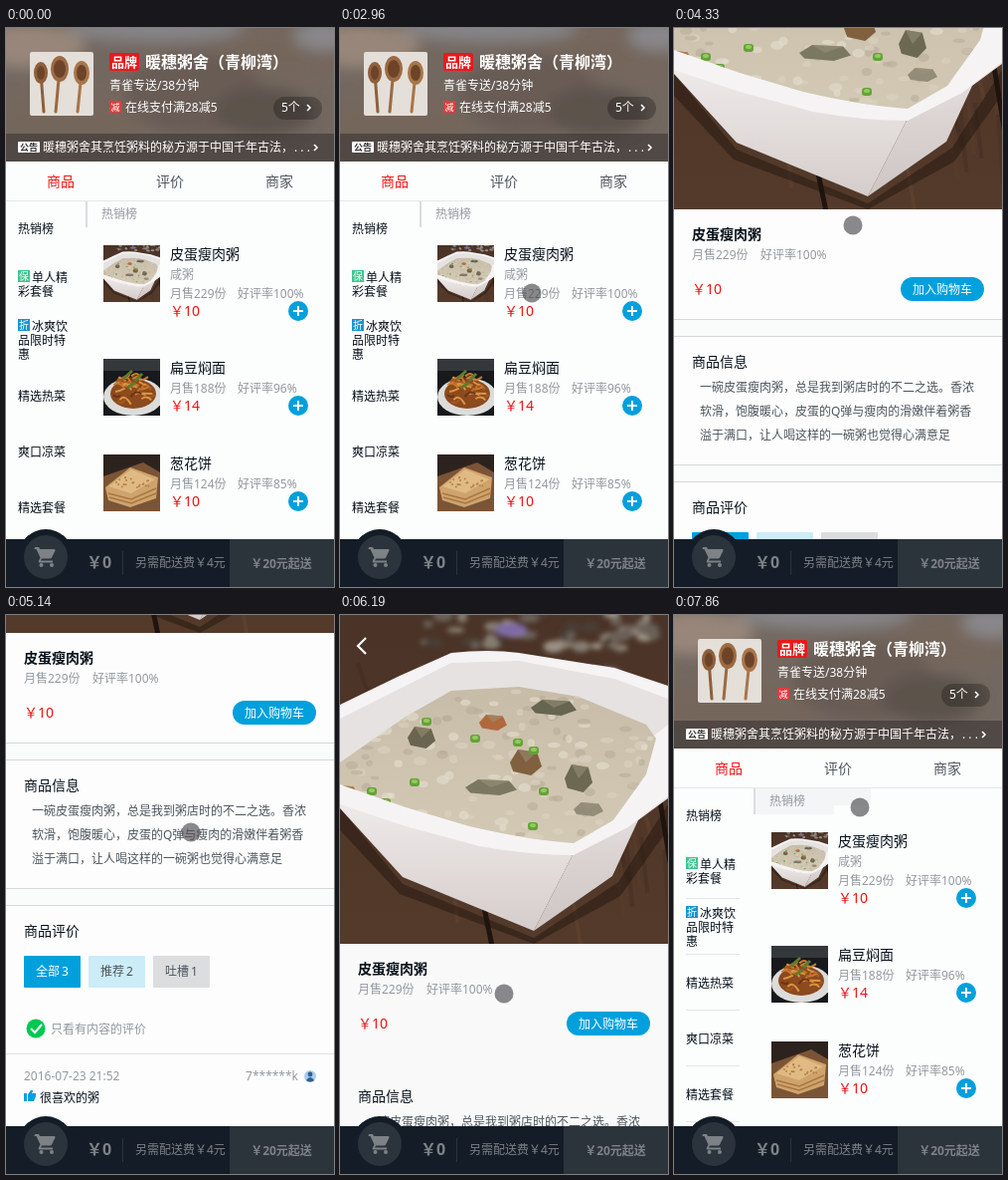
An HTML page that plays this animation: 330x561 px, repeating every 8 s.

```html
<!DOCTYPE html>
<html lang="zh-CN">
<head>
<meta charset="utf-8">
<title>点餐</title>
<style>
html, body { margin: 0; width: 100%; height: 100%; overflow: hidden; background: #fcfdfd; }
svg { display: block; }
text { font-family: 'Noto Sans', 'Noto Sans CJK SC', 'Noto Sans CJK', sans-serif; white-space: pre; }
</style>
</head>
<body>
<svg id="stage" width="330" height="561" viewBox="0 0 330 561"></svg>
<script>
const INK = '#07111b', GREY = '#93999f', SLATE = '#4d555d', BLUE = '#00a0dc', RED = '#f01414', DIM = '#7d8287';

const text = (x, y, str, fill = INK, size = 12, more = '') =>
  `<text x="${x}" y="${y}" fill="${fill}" font-size="${size}" ${more}>${str}</text>`;
const rect = (x, y, w, h, fill, more = '') =>
  `<rect x="${x}" y="${y}" width="${w}" height="${h}" fill="${fill}" ${more}/>`;
const oval = (x, y, rx, ry, fill, more = '') =>
  `<ellipse cx="${x}" cy="${y}" rx="${rx}" ry="${ry}" fill="${fill}" ${more}/>`;
const dot = (x, y, r, fill, more) => oval(x, y, r, r, fill, more);
const path = (d, fill, more = '') => `<path d="${d}" fill="${fill}" ${more}/>`;
const line = (d, stroke, width = 1, more = '') =>
  path(d, 'none', `stroke="${stroke}" stroke-width="${width}" ${more}`);
const picture = (x, y, size, box, body) =>
  `<svg x="${x}" y="${y}" width="${size}" height="${size}" viewBox="0 0 ${box} ${box}">${body}</svg>`;
const gradient = (id, a, b, c) =>
  `<linearGradient id="${id}" x1="0" y1="0" x2="0" y2="1"><stop offset="0" stop-color="${a}"/><stop offset=".5" stop-color="${b}"/><stop offset="1" stop-color="${c}"/></linearGradient>`;
const BOLD = 'font-weight="700"', MID = 'text-anchor="middle"', END = 'text-anchor="end"';

let seed = 7;
const rnd = (a, b) => {
  seed = (seed * 16807) % 2147483647;
  return +(a + (b - a) * seed / 2147483647).toFixed(1);
};
const pick = list => list[Math.floor(rnd(0, list.length - 0.1))];
const many = (n, make) => Array.from({ length: n }, (_, i) => make(i)).join('');

const chunk = ([x, y, w, h, c]) =>
  path(`M${x - w} ${y}L${x - w / 2} ${y - h}L${x + w * .7} ${y - h * .8}L${x + w} ${y + h * .3}L${x + w / 3} ${y + h}L${x - w * .8} ${y + h * .7}Z`, c) +
  path(`M${x - w / 2} ${y - h}L${x + w * .7} ${y - h * .8}L${x} ${y}Z`, '#9c937a', 'opacity=".5"');

function porridge() {
  const chunks = [
    [82, 123, 14, 11, '#6a6450'], [187, 148, 16, 13, '#80603f'], [152, 173, 26, 8, '#7b7861'],
    [240, 164, 14, 14, '#6c6852'], [215, 93, 23, 8, '#666550'], [154, 108, 14, 8, '#b0693f'],
    [6, 177, 11, 6, '#b87043'], [250, 195, 15, 7, '#938c78']
  ];
  const herbs = [[87, 107], [75, 168], [136, 124], [179, 128], [195, 136], [205, 177], [194, 212], [46, 188], [32, 177]];
  return rect(0, 0, 330, 330, 'url(#wood)') +
    many(40, () => line(`M${rnd(-20, 330)} ${rnd(40, 270)}l${rnd(5, 14)} ${rnd(40, 90)}`, pick(['#6b4a34', '#3d281c', '#5c3f2c']), 4, 'opacity=".35"')) +
    line('M140 270L153 332M316 150L334 260', '#20140f', 5) +
    `<g filter="url(#soft)">${many(46, () => oval(rnd(85, 330), rnd(-4, 34), rnd(4, 11), rnd(3, 7), pick(['#857b70', '#4a3d35', '#6b6058', '#9a9084'])))}` +
    `${oval(172, 15, 16, 7, '#7f6aa6')}${oval(270, 58, 12, 5, '#8f83a9')}</g>` +
    path('M0 194L63 270L195 324L280 268L330 190V215L282 282L195 330L60 280L0 216Z', '#1e130d', 'opacity=".45"') +
    path('M0 185L140 230L235 239L195 317L63 263L0 194Z', 'url(#side)') +
    path('M235 239L330 178V184L300 206L274 262L195 317Z', 'url(#turn)') +
    path('M0 90L60 61L112 38Q150 34 180 38L276 53L330 71V182L290 213L235 241Q190 241 140 232L66 212L0 190Z', '#f5f3f4') +
    path('M0 104L112 48L180 46L276 64L330 84V110L305 130L120 76L0 150Z', '#e6e2e2') +
    `<g clip-path="url(#soup)">${rect(0, 60, 330, 180, 'url(#broth)')}` +
    many(170, () => oval(rnd(0, 315), rnd(76, 228), rnd(3, 7), rnd(2, 4.5), pick(['#e6dfcf', '#dcd3c1', '#b9ae99']), 'opacity=".6"')) +
    chunks.map(chunk).join('') +
    herbs.map(([x, y]) => rect(x - 5, y - 4, 10, 8, '#64a337', 'rx="3"') + oval(x, y - 1, 3, 2, '#93c960')).join('') + '</g>';
}

function noodles() {
  return rect(0, 0, 57, 57, '#17191c') + rect(0, 0, 57, 12, '#34383b') +
    oval(30, 38, 30, 19, '#dcdcda') + oval(30, 35, 23, 15, '#8c4a1e') +
    many(34, () => line(`M${rnd(8, 44)} ${rnd(15, 44)}q${rnd(2, 6)} ${rnd(-8, 4)} ${rnd(6, 12)} ${rnd(-4, 5)}`,
      pick(['#c9792e', '#a4581f', '#6b3516', '#d99545']), 2)) +
    line('M20 20l9 -8M32 22l7 -7M24 29l8 -5', '#5d7c2c', 3);
}

function pancake() {
  return rect(0, 0, 57, 57, '#2d231e') + path('M0 22L40 8L57 18V57H0Z', '#7b5436') +
    path('M2 33L27 13L55 23L53 44L27 53L5 46Z', '#cfa36c') +
    path('M5 32L28 15L52 25L28 39Z', '#e0ba83') +
    line('M5 39L28 45L53 34M6 43L28 49L53 39', '#a87743', 1.5) +
    many(22, () => dot(rnd(13, 46), rnd(23, 33), 1, '#b58247'));
}

function spoons() {
  return rect(0, 0, 64, 64, '#e4dfd9', 'rx="2"') +
    [[11, 21, 7, '#8e5f3c', 14], [30, 17, 9, '#9c6a42', 26], [52, 21, 8, '#a8764a', 48]].map(([x, y, r, c, x2]) =>
      line(`M${x} ${y}L${x2} 60`, c, 3, 'stroke-linecap="round"') + oval(x, y, r, r + 4, c) + oval(x, y, r - 3, r, '#6d4429')).join('');
}

function header() {
  const blobs = [[20, 18, 60, 22, '#978679'], [150, 0, 90, 14, '#858487'], [280, 24, 70, 26, '#74665b'],
    [60, 96, 80, 30, '#74665c'], [190, 66, 70, 40, '#685c54'], [260, 84, 50, 24, '#5c524b'], [320, 8, 30, 15, '#88878a']];
  return rect(0, 0, 330, 134, '#736860') +
    `<g filter="url(#blur)" clip-path="url(#top)">${blobs.map(b => oval(...b)).join('')}</g>` +
    rect(0, 106, 330, 28, '#1f1d1f', 'opacity=".42"') + picture(24, 24, 64, 64, spoons()) +
    rect(104, 25, 30, 18, '#e8191c', 'rx="2"') + text(119, 39, '品牌', '#fff', 13, BOLD + ' ' + MID) +
    text(140, 40, '暖穗粥舍（青柳湾）', '#fff', 16, BOLD) +
    text(104, 62, '青雀专送/38分钟', '#fff') +
    rect(104, 73, 12, 12, '#dc3f42') + text(110, 82.5, '减', '#fff', 9, MID) +
    text(120, 84, '在线支付满28减5', '#fff') +
    rect(269, 69, 49, 23, '#000', 'rx="11.5" opacity=".25"') + text(277, 84, '5个', '#fff') +
    line('M303 77l3 3-3 3', '#fff', 1.5) +
    rect(12, 114, 22, 11, '#fff', 'rx="1"') + text(23, 123, '公告', '#333', 9, BOLD + ' ' + MID) +
    text(37, 124, '暖穗粥舍其烹饪粥料的秘方源于中国千年古法，', '#fff') +
    text(290, 124, '. . .', '#fff') + line('M310 117l3 3-3 3', '#fff', 1.5);
}

const badge = (y, color, ch) => rect(12, y, 12, 12, color) + text(18, y + 9.5, ch, '#fff', 10, MID);

function menu() {
  const rows = [[12, 206, '热销榜'], [26, 255, '单人精'], [12, 269, '彩套餐'], [26, 304, '冰爽饮'], [12, 318, '品限时特'],
    [12, 332, '惠'], [12, 374, '精选热菜'], [12, 430, '爽口凉菜'], [12, 486, '精选套餐']];
  const rules = many(5, i => rect(12, 284 + 56 * i, 54, 1, '#e3e5e7'));
  return `<g id="rules">${rules}</g>` + rows.map(r => text(...r)).join('') +
    badge(243, '#3fc58d', '保') + badge(292, '#1a94cf', '折');
}

function dish(y, art, box, name, sold, rate, price, note) {
  const d = note ? 19 : 0;
  return picture(98, y, 57, box, art) + text(165, y + 14, name, INK, 14) +
    (note ? text(165, y + 34, note, GREY) : '') +
    text(165, y + 34 + d, `月售${sold}份`, GREY) + text(233, y + 34 + d, `好评率${rate}%`, GREY) +
    text(165, y + 52 + d, '￥' + price, RED, 14) + dot(294, y + 47 + d, 10, BLUE) +
    line(`M289 ${y + 47 + d}h10m-5 -5v10`, '#fff', 2);
}

function shop() {
  return rect(0, 0, 330, 561, '#fcfdfd') + header() +
    text(55, 159, '商品', RED, 14, MID) + text(165, 159, '评价', SLATE, 14, MID) + text(275, 159, '商家', SLATE, 14, MID) +
    rect(0, 173, 330, 1, '#e6e7e8') + menu() +
    `<g id="strip">${rect(82, 174, 116, 17, '#f3f5f7')}${rect(82, 191, 79, 9, '#f3f5f7')}</g>` +
    rect(80, 174, 2, 26, '#d9dde1') + text(96, 191, '热销榜', GREY) +
    dish(218, porridge(), 330, '皮蛋瘦肉粥', 229, 100, 10, '咸粥') +
    dish(332, noodles(), 57, '扁豆焖面', 188, 96, 14) +
    dish(428, pancake(), 57, '葱花饼', 124, 85, 10);
}

const gap = y => rect(0, y, 330, 18, '#fafbfb') + rect(0, y, 330, 1, '#d5d8da') + rect(0, y + 17, 330, 1, '#d5d8da');
const chip = (x, fill, ink, label, n) => rect(x, 654, 57, 32, fill, 'rx="1"') + text(x + 12, 674, label, ink) + text(x + 38, 674, n, ink);

function detail() {
  const story = ['一碗皮蛋瘦肉粥，总是我到粥店时的不二之选。香浓', '软滑，饱腹暖心，皮蛋的Q弹与瘦肉的滑嫩伴着粥香', '溢于满口，让人喝这样的一碗粥也觉得心满意足'];
  return picture(0, 0, 330, 330, porridge()) +
    `<g id="ring">${dot(22, 31, 10.5, 'none', 'stroke="#c9c5c3" stroke-width="1.5"')}</g>` +
    line('M26 23l-8 8 8 8', '#fff', 2.2) +
    text(18, 360, '皮蛋瘦肉粥', INK, 14, BOLD) + text(18, 380, '月售229份', GREY) + text(87, 380, '好评率100%', GREY) +
    text(18, 415, '￥10', RED, 14) + rect(228, 398, 84, 24, BLUE, 'rx="12"') + text(270, 414.5, '加入购物车', '#fff', 12, MID) +
    `<g id="gaps">${gap(440)}${gap(586)}</g>` +
    text(18, 488, '商品信息', INK, 14) + story.map((s, i) => text(26, 513 + 24 * i, s, SLATE)).join('') +
    text(18, 634, '商品评价', INK, 14) +
    chip(18, BLUE, '#fff', '全部', 3) + chip(83, '#ccecf8', SLATE, '推荐', 2) + chip(148, '#dbdddf', SLATE, '吐槽', 1) +
    dot(30, 727, 9.5, '#00c850') + line('M25 727l4 4 7-8', '#fff', 2) + text(45, 732, '只看有内容的评价', GREY) +
    rect(0, 752, 330, 1, '#e0e2e4') + text(18, 779, '2016-07-23 21:52', GREY) + text(294, 779, '7******k', GREY, 12, END) +
    dot(306, 775, 6, '#a9cdea') + dot(306, 773, 2.4, '#315f96') + path('M302 779q4 -6 8 0q-4 3 -8 0Z', '#315f96') +
    path('M18 792h3v8h-3ZM22 793l3-4q2-1 2 1l-1 2h4v3l-2 5h-6Z', BLUE) + text(34, 801, '很喜欢的粥', INK);
}

function cart() {
  return rect(0, 513, 330, 48, '#141d27') + rect(225, 513, 105, 48, '#2b333b') +
    dot(40, 531, 28, '#141d27') + dot(40, 531, 22, '#2b343c') +
    path('M29 521h4l1 2h14.500q1.500 0 1 1.500l-3.500 7q-.5 1-2 1h-8l-1 2h12v2h-13q-2 0-1-2l1.500-3-4-8.500h-2Z', DIM) +
    dot(35.5, 539, 2, DIM) + dot(46, 539, 2, DIM) +
    text(81, 542, '￥0', DIM, 16, BOLD) + rect(117, 525, 1, 24, '#2c343d') +
    text(130, 541, '另需配送费￥4元', DIM) + text(277, 541.5, '￥20元起送', DIM, 12, BOLD + ' ' + MID);
}

const stage = document.getElementById('stage');
stage.innerHTML = `<defs>
<filter id="blur" x="-20%" y="-20%" width="140%" height="140%"><feGaussianBlur stdDeviation="7"/></filter>
<filter id="soft"><feGaussianBlur stdDeviation="2.5"/></filter>
${gradient('wood', '#4a3327', '#503628', '#543a2a')}
${gradient('broth', '#c6bba6', '#cdc3ae', '#d3cab6')}
${gradient('side', '#efebeb', '#e2dcdb', '#d5cdcb')}
${gradient('turn', '#e9e4e4', '#d9d2d1', '#cec6c4')}
<clipPath id="soup"><path d="M0 148L66 102L112 76L180 72L240 82L308 110L318 124L308 160L275 206L235 229Q190 226 130 212L66 193L0 170Z"/></clipPath>
<clipPath id="top"><rect width="330" height="134"/></clipPath>
<clipPath id="view"><rect width="330" height="513"/></clipPath>
</defs><g>${shop()}</g>
<g id="sheet" clip-path="url(#view)">${rect(0, 0, 330, 561, '#fdfdfd', 'id="paper"')}<g id="page">${detail()}</g></g>
${cart()}<circle id="touch" r="9.5" fill="#48484b" fill-opacity=".64"/>`;

const [rules, strip, ring, gaps, sheet, paper, page, touch] =
  ['rules', 'strip', 'ring', 'gaps', 'sheet', 'paper', 'page', 'touch'].map(id => document.getElementById(id));

// The screen refreshes in runs: first time, last time, count.
const ticks = [[0, 370, 2], [640, 770, 2], [1330, 1900, 5], [2210, 2960, 6], [3240, 3360, 2], [3730, 4330, 6], [4450, 4720, 3],
  [4880, 5140, 3], [5270, 5800, 5], [5920, 6070, 2], [6200, 6610, 4], [6730, 7000, 3], [7150, 7560, 2], [7710, 7860, 2]]
  .flatMap(([a, b, n]) => Array.from({ length: n }, (_, i) => Math.round((a + (b - a) * i / (n - 1)) / 10) * 10));

const pointer = [[370, 322.5, 365.5], [770, 322.5, 365.5], [1330, 313, 348], [1900, 169, 261], [2210, 169, 268], [2510, 180, 393],
  [2660, 184, 370], [2960, 193, 266], [3360, 193, 266], [3730, 186, 330], [3970, 181, 346], [4330, 180, 198], [4580, 182, 92],
  [4720, 182, 75], [4880, 182, 100], [5140, 186, 218], [5270, 186, 225], [5800, 181, 410], [5920, 178, 428], [6070, 165, 380],
  [6610, 22, 31], [7150, 22, 31], [7560, 75, 85], [7860, 187, 193]];
const scroll = [[3970, 0], [4090, 38], [4330, 148], [4580, 265], [4720, 312], [5140, 312], [5270, 296], [5800, 39], [5920, 9], [6070, 0]];

function at(keys, t) {
  const i = keys.findIndex(k => k[0] > t);
  if (i < 0) return keys[keys.length - 1].slice(1);
  if (i === 0) return keys[0].slice(1);
  const a = keys[i - 1], b = keys[i], p = (t - a[0]) / (b[0] - a[0]);
  return a.slice(1).map((v, j) => v + (b[j + 1] - v) * p);
}

const show = (el, on) => el.setAttribute('display', on ? 'inline' : 'none');
const move = (el, x, y) => el.setAttribute('transform', `translate(${x} ${y})`);

function render(time) {
  const t = ticks.filter(k => k <= time).pop();
  show(sheet, t >= 3240 && t < 7150);
  move(sheet, t < 3360 ? 165 : t >= 7000 ? 82 : 0, 0);
  move(page, 0, -Math.round(at(scroll, t)[0]));
  paper.setAttribute('fill', t >= 6070 ? '#f9f9f9' : '#fdfdfd');
  show(gaps, t < 6070);
  show(ring, t >= 6610);
  show(rules, t >= 7000);
  show(strip, t >= 7860);
  show(touch, t >= 370 && (t < 770 || t >= 1330));
  move(touch, ...at(pointer, t));
}

const start = performance.now();
function loop() {
  render((performance.now() - start) % 8000);
  requestAnimationFrame(loop);
}
loop();
</script>
</body>
</html>
```
